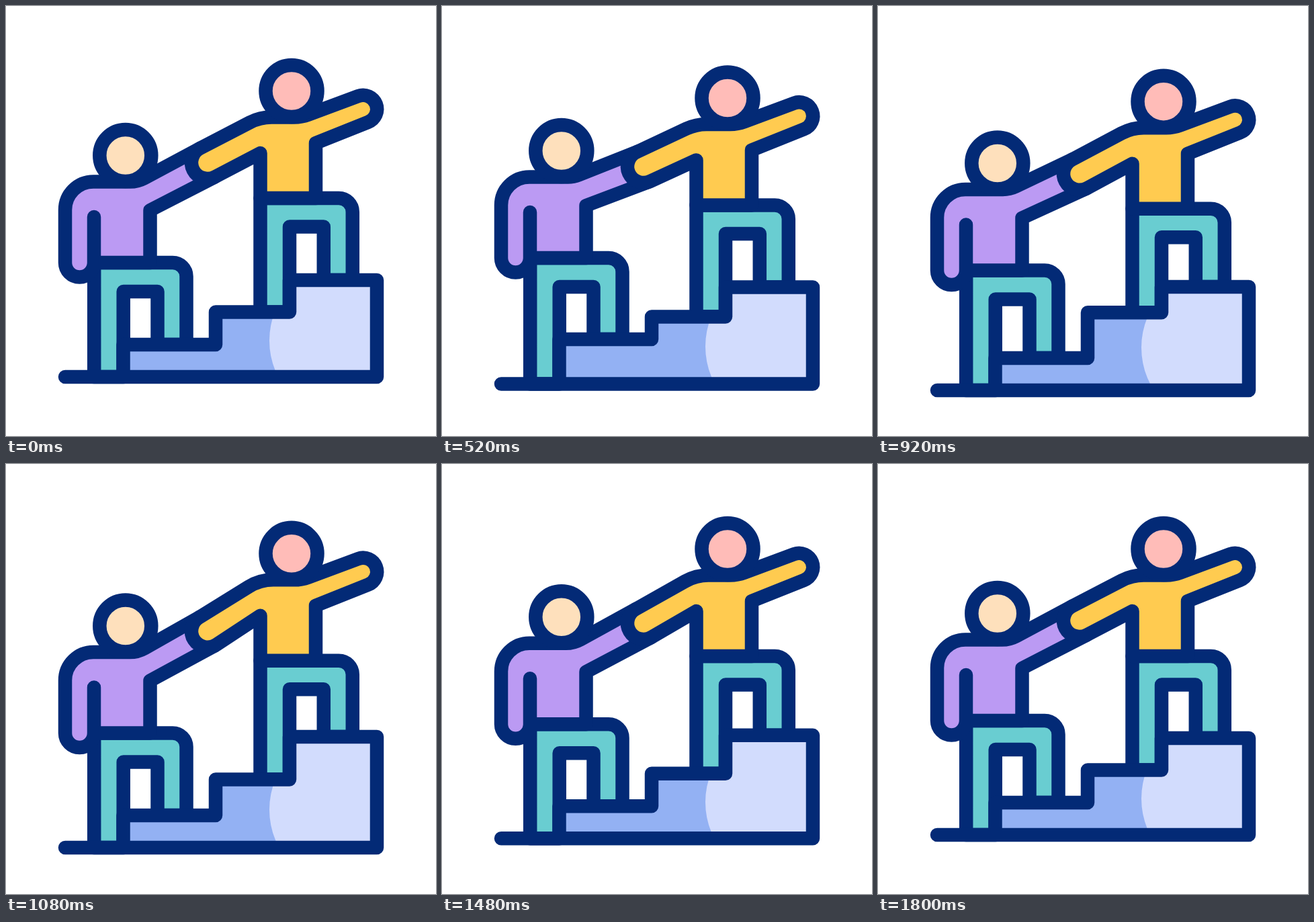
An HTML page with a canvas that plays this animation: 640 px wide and 640 px high, repeating every 1.84 s.

```html
<!DOCTYPE html>
<html lang="en">
<head>
<meta charset="utf-8">
<title>Helping hand on the stairs</title>
<style>
html, body { margin: 0; width: 100%; height: 100%; overflow: hidden; background: #fff; }
canvas { display: block; width: 100vmin; height: 100vmin; }
</style>
</head>
<body>
<canvas id="stage" width="640" height="640"></canvas>
<script>
const ctx = document.getElementById('stage').getContext('2d');
const LOOP = 1840, STEP = 40, HAND = 24;
const NAVY = '#032a76', PURPLE = '#bb9af3', YELLOW = '#ffcb50', TEAL = '#69cdd1',
  PINK = '#ffbcb8', SKIN = '#fee0bc', BLUE = '#93b1f3', PALE = '#d2dcfd';

// Ease-in-out progress of t between two times.
function ease(t, from, to) {
  const x = Math.min(1, Math.max(0, (t - from) / (to - from)));
  let u = x;
  for (let i = 0; i < 5; i++)
    u -= (1.26 * u - 0.78 * u * u + 0.52 * u ** 3 - x) / (1.26 - 1.56 * u + 1.56 * u * u);
  return u * u * (3 - 2 * u);
}

// Rises between a and b, falls between c and d.
const bump = (t, a, b, c, d) => ease(t, a, b) - ease(t, c, d);

function pose(t) {
  const sink = 20 * bump(t, 80, 940, 940, 1780);
  const left = sink - 20 * bump(t, 160, 640, 680, 1120);
  const right = sink * (1 - ease(t, 720, 1340));
  return {
    left, right,
    ground: 552 + sink,
    low: 504 + sink - 20 * bump(t, 40, 340, 460, 770),
    mid: 455.5 + sink - 20 * bump(t, 430, 740, 877, 1185),
    high: 408 + sink - 21 * bump(t, 770, 1080, 1317, 1625),
    hand: { x: 300, y: 233 + (sink * 2 + left + right) / 4 }
  };
}

function paint(fill, trace) {
  ctx.beginPath();
  trace();
  ctx.closePath();
  ctx.fillStyle = fill;
  ctx.fill();
  ctx.stroke();
}

function poly(...p) {
  for (let i = 0; i < p.length; i += 2) ctx.lineTo(p[i], p[i + 1]);
}

const head = (x, y, fill) => paint(fill, () => ctx.arc(x, y, 38.5, 0, 7));

// Angle of the lower side of an arm that runs from the hand to an armpit.
function underside(hand, x, y, side) {
  const dx = x - hand.x, dy = y - hand.y;
  return Math.atan2(dy, dx) + side * Math.acos(HAND / Math.hypot(dx, dy));
}

const rim = (hand, a) => [hand.x + HAND * Math.cos(a), hand.y + HAND * Math.sin(a)];

// Trousers from hip x; feet stand on two levels.
function trousers(x, top, knee, foot, lifted) {
  paint(TEAL, () => {
    ctx.moveTo(x, foot);
    ctx.lineTo(x, top);
    ctx.arcTo(x + 137.3, top, x + 137.3, top + 50, 20.5);
    poly(x + 137.3, lifted, x + 94.3, lifted, x + 94.3, knee, x + 43.5, knee, x + 43.5, foot);
  });
}

function stairs({ ground, low, mid, high }) {
  const trace = () => poly(174.5, ground, 174.5, low, 312, low, 312, mid,
    422, mid, 422, high, 552, high, 552, ground);
  ctx.save();
  ctx.beginPath();
  trace();
  ctx.clip();
  ctx.fillStyle = BLUE;
  ctx.fillRect(0, 0, 640, 640);
  ctx.fillStyle = PALE;
  ctx.beginPath();
  ctx.arc(510, 498 + (ground - 552 + mid - 455.5) / 2, 118, 0, 7);
  ctx.rect(415, 300, 200, 340);
  ctx.fill();
  ctx.restore();
  ctx.beginPath();
  trace();
  ctx.lineTo(88, ground);
  ctx.stroke();
}

function leftBody(dy, hand) {
  const pit = 304 + dy, a = underside(hand, 214.5, pit, -1);
  paint(PURPLE, () => {
    poly(131, 314 + dy, 131, 382 + dy);
    ctx.arc(109.5, 382 + dy, 21.5, 0, Math.PI);
    ctx.arc(130, 303.5 + dy, 42, Math.PI, Math.PI * 1.5);
    const top = rim(hand, a + Math.PI);
    ctx.arcTo(196, 261.5 + dy, ...top, 45);
    poly(...top, ...rim(hand, a), 214.5, pit, 214.5, 382 + dy, 131, 382 + dy);
  });
}

function rightBody(dy, hand) {
  const pit = 219 + dy, a = underside(hand, 378.5, pit, 1), tilt = 1.203;
  paint(YELLOW, () => {
    poly(378.5, 286 + dy, 378.5, pit);
    ctx.arc(hand.x, hand.y, HAND, a, a + Math.PI);
    ctx.arcTo(378, 165.5 + dy, 420, 165.5 + dy, 70);
    ctx.arcTo(440, 165.5 + dy, 524, 134 + dy, 60);
    ctx.arc(531.5, 153.5 + dy, 20.7, tilt - Math.PI, tilt);
    poly(461, 204 + dy, 461, 286 + dy);
  });
}

function draw(t) {
  const p = pose(t);
  ctx.fillStyle = '#fff';
  ctx.fillRect(0, 0, 640, 640);
  ctx.strokeStyle = NAVY;
  ctx.lineWidth = 20.5;
  ctx.lineCap = ctx.lineJoin = 'round';
  trousers(131.2, 382 + p.left, 425 + p.left, p.ground, p.low);
  trousers(378.5, 286 + p.right, 328.5 + p.right, p.mid, p.high);
  stairs(p);
  leftBody(p.left, p.hand);
  rightBody(p.right, p.hand);
  head(177.8, 222.5 + p.left, SKIN);
  head(425, 126.5 + p.right, PINK);
}

const start = performance.now();
function tick() {
  const t = (performance.now() - start) % LOOP;
  draw(Math.floor(t / STEP) * STEP);
  requestAnimationFrame(tick);
}
tick();
</script>
</body>
</html>
```
